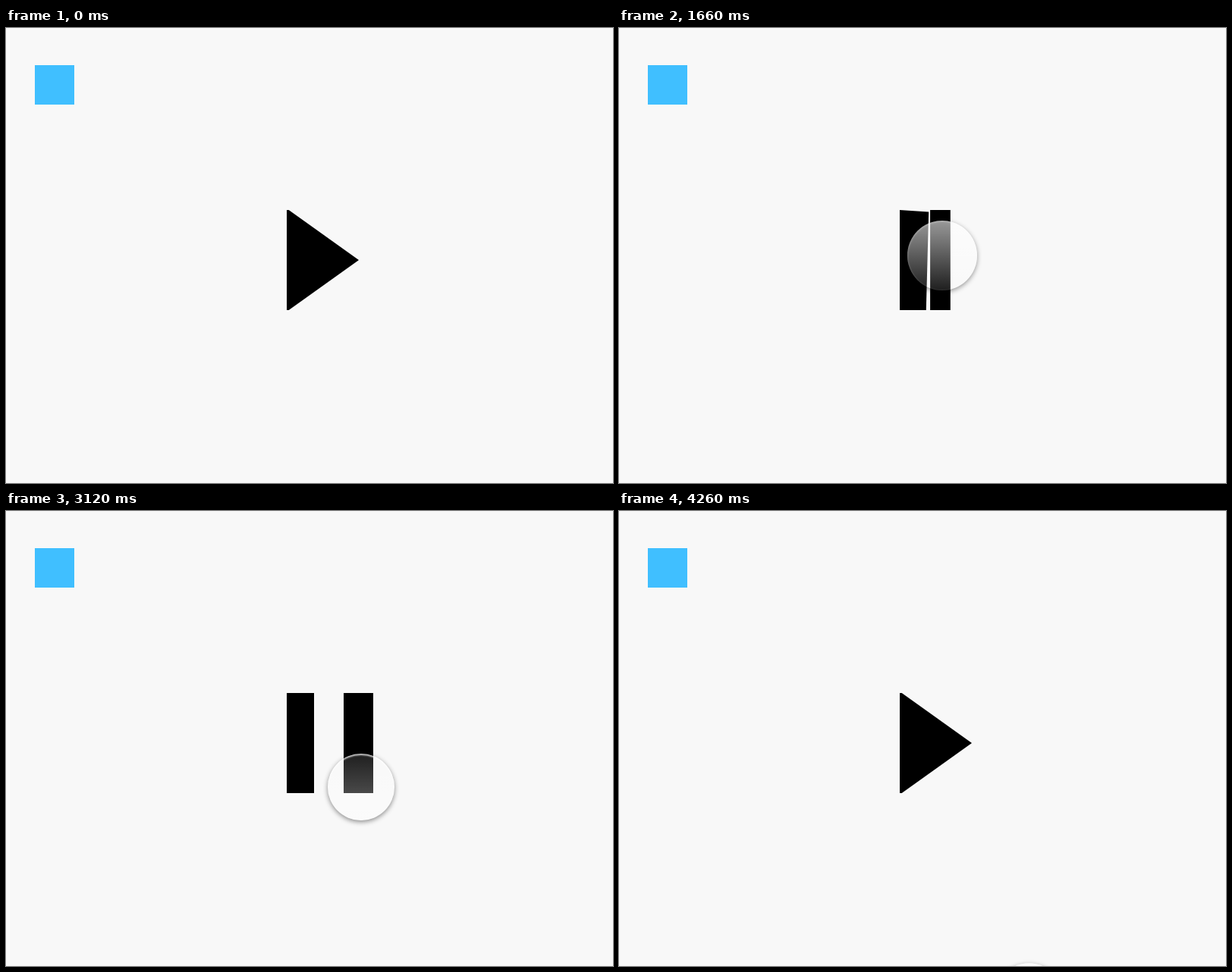
An HTML page for the animation above (4.28 s loop, 800x600 px).

```html
<!DOCTYPE html>
<html lang="en">
<head>
<meta charset="utf-8">
<title>Play and pause</title>
<style>
  html, body { margin: 0; width: 100%; height: 100%; overflow: hidden; background: #f8f8f8; }
  #stage { position: absolute; left: 0; top: 0; width: 800px; height: 600px; overflow: hidden; }
  svg { position: absolute; left: 0; top: 0; }
  #touch {
    position: absolute; left: -46px; top: -46px; width: 92px; height: 92px;
    border-radius: 50%;
    background: linear-gradient(rgba(255, 255, 255, .6), rgba(255, 255, 255, .12));
    box-shadow: 0 2px 6px rgba(0, 0, 0, .4), inset 0 1px 3px rgba(255, 255, 255, .4);
  }
  #touch.pressed {
    left: -44px; top: -44px; width: 88px; height: 88px;
    background: linear-gradient(rgba(255, 255, 255, .12), rgba(255, 255, 255, .4));
    box-shadow: 0 2px 6px rgba(0, 0, 0, .45), inset 0 2px 2px rgba(255, 255, 255, .75);
  }
</style>
</head>
<body>
<div id="stage">
  <svg width="800" height="600" viewBox="0 0 800 600">
    <rect x="38" y="49" width="52" height="52" fill="#40bfff"/>
    <polygon id="main"/>
    <rect id="bar" y="240" height="132"/>
  </svg>
  <div id="touch"></div>
</div>
<script>
  const LOOP = 4280;
  const main = document.getElementById('main');
  const bar = document.getElementById('bar');
  const touch = document.getElementById('touch');

  const mix = (a, b, p) => a + (b - a) * p;
  const progress = (t, start, length) => Math.min(1, Math.max(0, (t - start) / length));
  const easeOut = u => 1 - (1 - u) ** 2;
  const easeInOut = u => u < .5 ? 2 * u * u : 1 - 2 * (1 - u) ** 2;

  // 0 is the play triangle, 1 the pause bars
  function morph(t, start, length) {
    return easeOut(progress(t, start, length)) - easeOut(progress(t, 3220, 600));
  }

  function drawIcon(t) {
    const shape = morph(t, 1330, 410);
    const slide = morph(t, 1435, 670);
    const grow = morph(t, 1335, 770);
    main.setAttribute('points', [
      [370, 240],
      [mix(372.7, 370, shape), 240],
      [mix(465, 406, shape), mix(306, 240, shape)],
      [mix(372.7, 406, shape), 372],
      [370, 372]
    ].join(' '));
    const width = mix(2, 39, grow);
    bar.setAttribute('x', Math.max(370, mix(371, 464.5, slide) - width / 2));
    bar.setAttribute('width', width);
  }

  function touchPosition(t) {
    if (t < 1100) {
      const left = 1 - progress(t, 500, 580);
      return [426 + 170 * left ** 1.9, 300 + 345 * left ** 1.62];
    }
    if (t < 3820) {
      const p = easeInOut(progress(t, 1875, 240));
      return [mix(426, 468, p), mix(300, 364, p)];
    }
    const u = (t - 3820) / 440;
    return [468 + 72 * u ** 1.82, 364 + 277.5 * u ** 1.14];
  }

  function drawTouch(t) {
    const [x, y] = touchPosition(t);
    const pressed = (t >= 1180 && t < 1340) || (t >= 3120 && t < 3220);
    touch.style.visibility = t < 520 ? 'hidden' : 'visible';
    touch.className = pressed ? 'pressed' : '';
    touch.style.transform = `translate(${x}px, ${y}px)`;
  }

  function frame() {
    const t = performance.now() % LOOP;
    drawIcon(t);
    drawTouch(t);
    requestAnimationFrame(frame);
  }
  frame();
</script>
</body>
</html>
```
